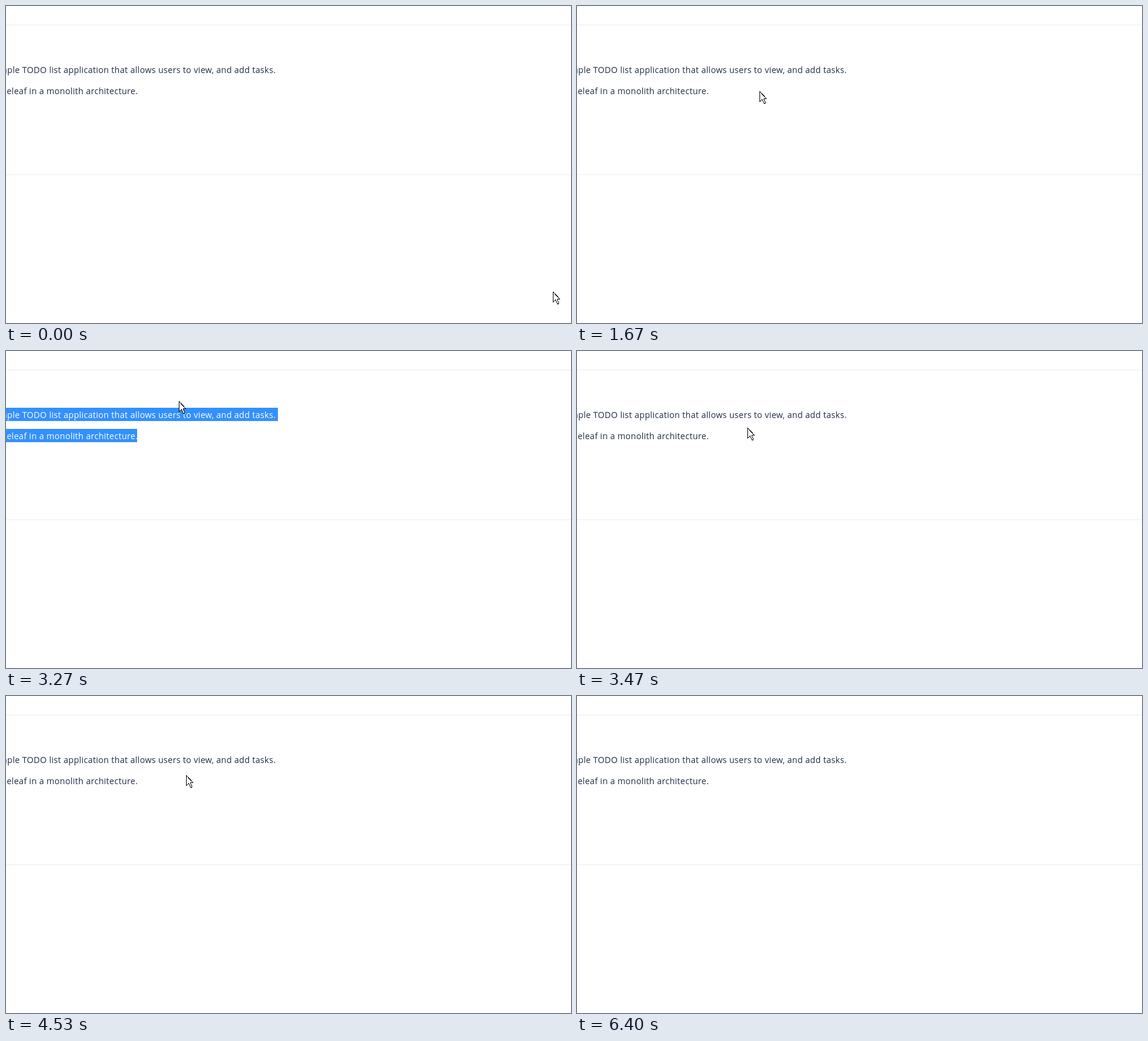
Recreate the animation shown at these times as an HTML page. Size 935x525 px, loop 7.34 s.

```html
<!DOCTYPE html>
<html lang="en">
<head>
<meta charset="utf-8">
<title>Text selection</title>
<style>
  html, body { margin: 0; width: 100%; height: 100%; overflow: hidden; background: #fff; }
  svg { display: block; width: 100%; height: 100%; }
  text { font: 14px "Open Sans", "Noto Sans", sans-serif; letter-spacing: .29px; white-space: pre; }
  .plain { fill: #1f2d45; }
  .picked { fill: #fff; }
  .mark { fill: #3390ff; }
  .rule { fill: #ebecec; }
  path { stroke: #000; shape-rendering: crispEdges; }
</style>
</head>
<body>
<svg viewBox="0 0 935 525">
  <defs>
    <clipPath id="clip"><rect id="c0" y="94" height="22"/><rect id="c1" y="129" height="22"/></clipPath>
    <g id="words">
      <text id="l0" x="2.1" y="111">ple TODO list application that allows users to view, and add tasks.</text>
      <text id="l1" x="1.2" y="146">eleaf in a monolith architecture.</text>
      <text x="2.1" y="111" text-anchor="end">m</text>
      <text x="1.2" y="146" text-anchor="end">m</text>
    </g>
  </defs>
  <rect class="rule" y="31" width="935" height="1"/>
  <rect class="rule" y="279" width="935" height="1"/>
  <use href="#words" class="plain"/>
  <rect class="mark" id="m0" y="94" height="22"/>
  <rect class="mark" id="m1" y="129" height="22"/>
  <g clip-path="url(#clip)"><use href="#words" class="picked"/></g>
  <path id="arrow" d="M.5 .5V17.5L4.5 13.5L7.5 20.5H9.5V18.5L7.5 13.5V12.5H11.5Z" fill="#fff"/>
  <path id="beam" d="M-3 -7.5H-1M1 -7.5H3M.5 -7V7M-3 7.5H-1M1 7.5H3" fill="none"/>
</svg>
<script>
const LOOP = 7340, STEP = 1000 / 15;
const PRESS = 41, RELEASE = 66, HIDE = 96;
const $ = id => document.getElementById(id);

// Hand strokes between rests, timed in steps; a bend makes the stroke a quadratic curve
const home = [905, 473];
const strokes = [
  { from: 0, to: 8, end: [695, 377] },
  { from: 10, to: 21, end: [358, 184], bend: [-79, -52] },
  { from: 22, to: 33, end: [300, 155], bend: [240, 90] },
  { from: 34, to: 37, end: [304, 80] },
  { from: 37, to: 45, end: [290, 59], bend: [210, 250] },
  { from: 48, to: 59, end: [311, 101], bend: [267, 185] },
  { from: 59, to: 61, end: [298, 86], bend: [298, 86] },
  { from: 65, to: 68, end: [298, 131] },
  { from: 72, to: 82, end: [187, 472], bend: [35, 620] },
  { from: 84, to: 86, end: [195, 490] },
  { from: 87, to: 95, end: [136, 381], bend: [260, 530] }
];
const lines = [{ top: 94, end: 450 }, { top: 129, end: 217 }];

const ease = u => 1 - (1 - u) ** 1.15;

function pointer(step) {
  let at = home;
  for (const { from, to, end, bend } of strokes) {
    if (step <= from) break;
    const u = ease(Math.min(1, (step - from) / (to - from)));
    at = at.map((a, i) => {
      const mid = bend ? bend[i] : (a + end[i]) / 2;
      return a * (1 - u) ** 2 + 2 * mid * u * (1 - u) + end[i] * u * u;
    });
  }
  return at.map(Math.round);
}

// Nearest letter edge to x
function snap(line, x) {
  const el = $("l" + line);
  let best = 0;
  for (let i = 0; i < el.getNumberOfChars(); i++) {
    const edge = el.getStartPositionOfChar(i).x;
    if (Math.abs(edge - x) < Math.abs(best - x)) best = edge;
  }
  return Math.round(best);
}

function selectionStarts(step, x, y) {
  const ends = lines.map(l => l.end);
  if (step < PRESS || step >= RELEASE) return ends;
  if (y < 90) return [0, 0];
  if (y < 122) return [snap(0, x), 0];
  return [ends[0], x < ends[1] ? snap(1, x) : ends[1]];
}

function place(id, x, y, shown) {
  $(id).setAttribute("transform", `translate(${x} ${y})`);
  $(id).setAttribute("visibility", shown ? "visible" : "hidden");
}

function draw(time) {
  const step = Math.floor((time + 4) / STEP);
  const [x, y] = pointer(step);
  selectionStarts(step, x, y).forEach((start, i) => {
    for (const id of ["m" + i, "c" + i]) {
      $(id).setAttribute("x", start);
      $(id).setAttribute("width", lines[i].end - start);
    }
  });
  const onText = lines.some(l => y >= l.top && y < l.top + 22 && x < l.end);
  const shown = step < HIDE;
  place("arrow", x, y, shown && !onText);
  place("beam", x, y, shown && onText);
}

const begin = performance.now();
function tick() {
  draw((performance.now() - begin) % LOOP);
  requestAnimationFrame(tick);
}
tick();
</script>
</body>
</html>
```
